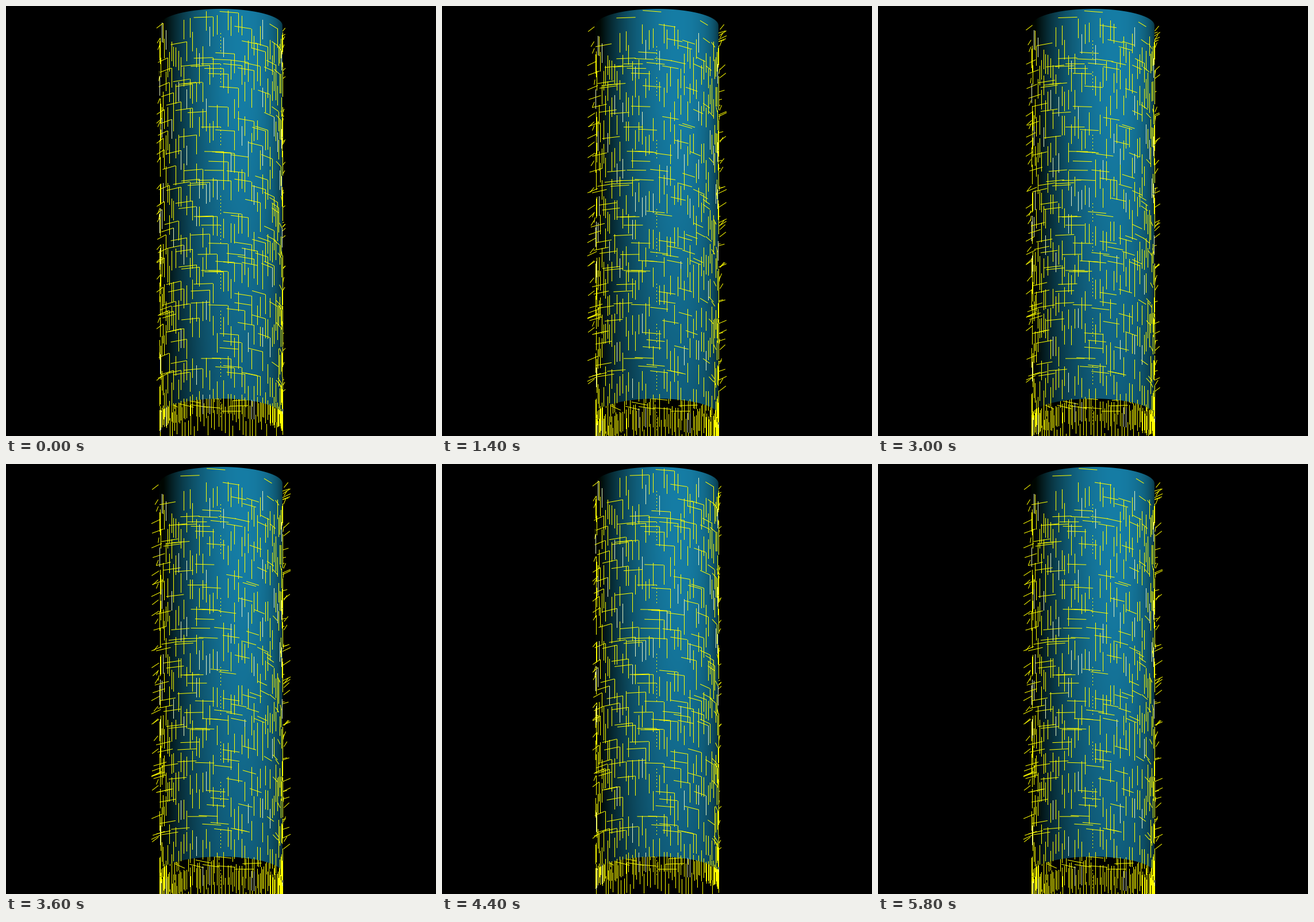
A matplotlib script that plays this animation: 748x748 px, repeating every 6000 ms.

```python
import numpy as np
import matplotlib.pyplot as plt
from matplotlib.animation import FuncAnimation
from matplotlib.collections import LineCollection
from matplotlib.patches import Polygon

SIZE, DPI = 748, 100
FRAMES, STEP_MS, CYCLE = 30, 200, 11
CX, R, B = 374, 107, 29            # cylinder axis, radius, rim half-height
TOP, BOTTOM = 34, 712              # rim centres
HOOP, AXIAL = 33.5, 33             # arrow lengths
SECTORS, ROWS = 36, 8              # mesh around and along the wall
LIGHT = np.radians(20)
BODY, AMBIENT = np.array([22, 125, 165]) / 255, np.array([0, 7, 2]) / 255
YELLOW, PALE = "#ffff00", "#e4f2c0"
rng = np.random.default_rng(11)


def on_wall(angle, level):
    """Stage position of a point at an angle (0 faces the viewer)."""
    return np.column_stack([CX + R * np.sin(angle), level - B * np.cos(angle)])


def arrows(base, way, shift):
    """Segments pushed along their own direction by a share of their length."""
    return np.stack([base + shift * way, base + (1 + shift) * way], axis=1)


# Three columns of nodes per sector, one node per row at a random height
sector = np.arange(SECTORS) * 360 / SECTORS - 0.6
columns = np.radians(np.add.outer(sector, [-3.2, 0, 3]).ravel())
angle = np.tile(columns, ROWS)
row = np.repeat(np.arange(ROWS), columns.size)
level = TOP + (row + rng.random(row.size)) * (BOTTOM - TOP - 10) / ROWS
has_hoop = (rng.random(row.size) < 0.45) & (level < BOTTOM - 30)

# An extra ring near the lower rim, deeper on the far wall
depth = np.where(np.cos(columns) > 0, 10, 60)
ring = BOTTOM - depth * rng.random(columns.size)

hoop_angle = angle[has_hoop]
hoop_base = on_wall(hoop_angle, level[has_hoop])
hoop_way = -HOOP * np.column_stack([np.cos(hoop_angle),
                                    B / R * np.sin(hoop_angle)])
hoop_front = np.cos(hoop_angle) > 0

axial_angle = np.concatenate([angle, columns])
axial_base = on_wall(axial_angle, np.concatenate([level, ring]))
axial_way = np.array([0, AXIAL])
axial_front = np.cos(axial_angle) > 0
seam = np.abs(axial_angle) < np.radians(1)     # half sunk into the wall
solid = axial_front & ~seam
tint = np.where(rng.random(solid.sum()) < 0.12, PALE, YELLOW)

fig = plt.figure(figsize=(SIZE / DPI, SIZE / DPI), dpi=DPI, facecolor="black")
ax = fig.add_axes([0, 0, 1, 1])
ax.axis("off")

# Lit wall, clipped to the outline between the two rims
xs = np.arange(CX - R, CX + R + 1)
ys = np.arange(BOTTOM)
facing = np.arcsin((xs - CX) / R)
lit = np.clip(np.cos(facing - LIGHT), 0, 1) ** 1.2
fade = 1 - 0.26 * (np.clip(ys - 150, 0, None) / 560) ** 1.2
wall = fade[:, None, None] * (AMBIENT + lit[:, None] * (BODY - AMBIENT))
shade = ax.imshow(wall, zorder=2, aspect="auto",
                  extent=(xs[0], xs[-1] + 1, BOTTOM, 0))
ax.set(xlim=(0, SIZE), ylim=(SIZE, 0))
arc = np.linspace(-np.pi / 2, np.pi / 2, 90)
outline = np.vstack([on_wall(arc, TOP), on_wall(arc[::-1], BOTTOM)])
shade.set_clip_path(Polygon(outline, transform=ax.transData))


def layer(z, smooth, colors=YELLOW, **style):
    lines = LineCollection([], colors=colors, linewidths=72 / DPI,
                           antialiaseds=smooth, zorder=z, **style)
    return ax.add_collection(lines, autolim=False)


far_hoops = layer(1, True)
far_axial = layer(1, False)
near_axial = layer(3, False, tint)
near_hoops = layer(4, True)
dotted = layer(3, False, linestyles=[(0, (1.4, 4.5))])


def update(frame):
    shift = frame % CYCLE / (CYCLE - 1)
    hoops = arrows(hoop_base, hoop_way, shift)
    axial = arrows(axial_base, axial_way, shift)
    far_hoops.set_segments(hoops[~hoop_front])
    near_hoops.set_segments(hoops[hoop_front])
    far_axial.set_segments(axial[~axial_front])
    near_axial.set_segments(axial[solid])
    dotted.set_segments(axial[seam])
    return far_hoops, far_axial, near_axial, near_hoops, dotted


anim = FuncAnimation(fig, update, frames=FRAMES, interval=STEP_MS,
                     repeat=True, repeat_delay=0, blit=False)
plt.show()
```
